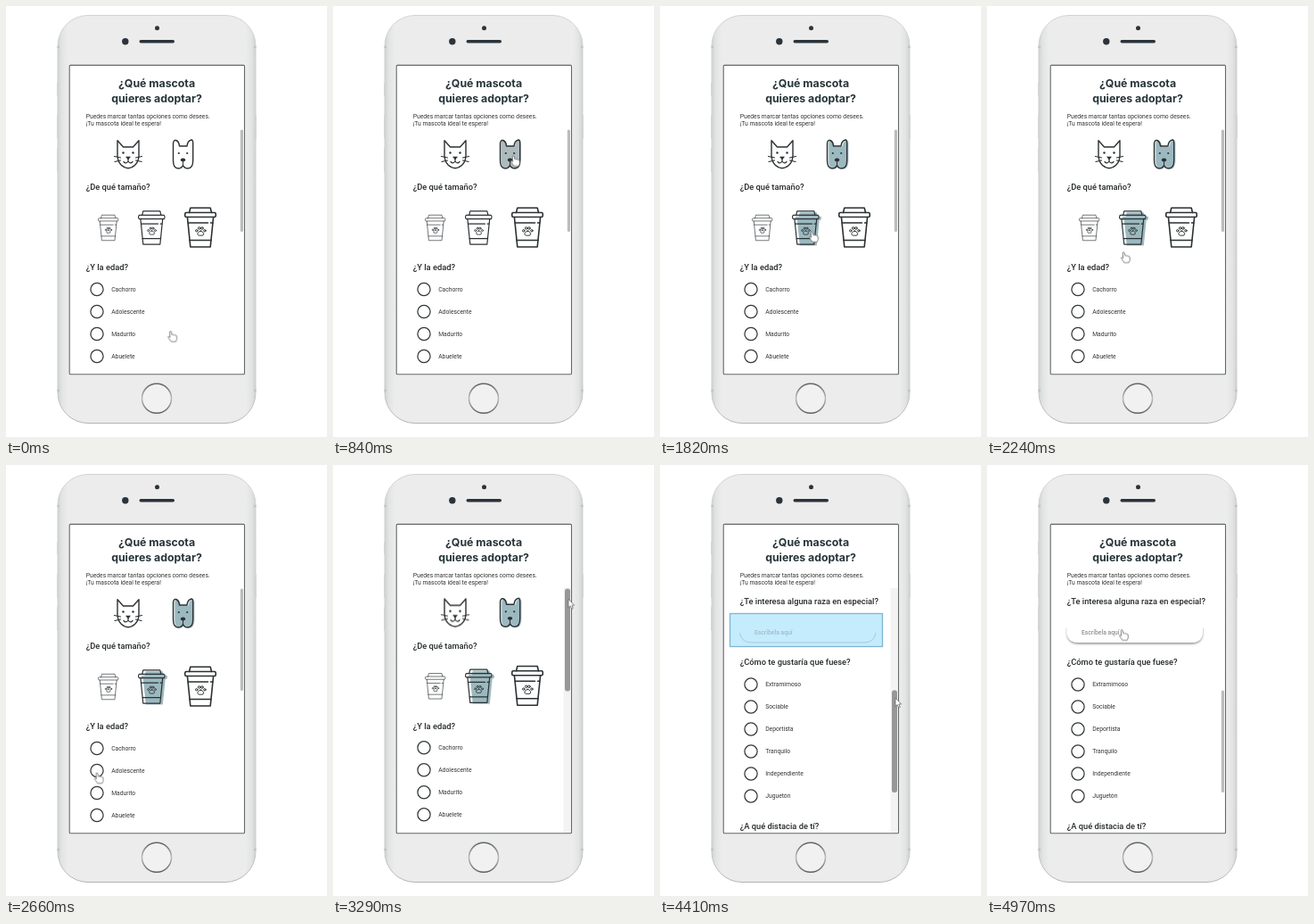
An HTML page that plays this animation: 360x483 px, repeating every 5040 ms.

```html
<!DOCTYPE html>
<html lang="es">
<head>
<meta charset="utf-8">
<title>Adopta una mascota</title>
<style>
  html, body { margin: 0; width: 100%; height: 100%; overflow: hidden; background: #fff; }
  svg { display: block; width: 100vw; height: 100vh; }
  text { font: 6.75px Roboto, sans-serif; fill: #333; }
  .title { font: 700 12.3px Inter, sans-serif; fill: #263439; text-anchor: middle; }
  .head { font-size: 9.3px; font-weight: 500; fill: #262a2b; }
  .hint { font-weight: 500; fill: #909090; }
  .line { fill: none; stroke: #2b3032; stroke-width: 1.4; stroke-linecap: round; stroke-linejoin: round; }
  .line * { vector-effect: non-scaling-stroke; }
  .thin { stroke-width: 1; }
  .ink { fill: #2b3032; stroke: none; }
  .ring { fill: none; stroke: #333738; stroke-width: 1.25; }
  .hover { fill: #aebbbe; stroke: none; }
  .picked { fill: #9cb9c0; stroke: none; }

  /* One 5040 ms clock drives everything */
  .cursor, .page, .thumb, .anim { animation: 5040ms infinite; }
  .cursor { animation-name: travel; animation-timing-function: ease-in-out; }
  .page { animation-name: scroll; animation-timing-function: ease-in-out; }
  .thumb { animation-name: slide; animation-timing-function: ease-in-out; }
  .anim { animation-timing-function: step-end; opacity: 0; }
  .dog-hover { animation-name: dogHover; }
  .dog-picked { animation-name: dogPicked; }
  .cup-hover { animation-name: cupHover; }
  .cup-picked { animation-name: cupPicked; }
  .hand { animation-name: hand; }
  .arrow { animation-name: arrow; }
  .bar-thin { animation-name: barThin; }
  .bar-wide { animation-name: barWide; }
  .bar-held { animation-name: barHeld; }
  .marked { animation-name: marked; }

  @keyframes travel {
    0%, 3% { transform: translate(184.3px, 364.2px); }
    15%, 24% { transform: translate(202px, 167.5px); }
    33%, 41% { transform: translate(170px, 252.5px); }
    51%, 56% { transform: translate(101.7px, 344.7px); }
    63%, 65% { transform: translate(264px, 150px); }
    73% { transform: translate(264px, 264px); }
    76%, 77% { transform: translate(267px, 220px); }
    84%, 89% { transform: translate(264px, 261px); }
    97%, 100% { transform: translate(151px, 184.5px); }
  }
  @keyframes scroll { 0%, 65% { transform: none; } 73%, 100% { transform: translateY(-270px); } }
  @keyframes slide { 0%, 65% { transform: none; } 73%, 100% { transform: translateY(114px); } }
  @keyframes dogHover { 0% { opacity: 0; } 14% { opacity: 1; } 20.8% { opacity: 0; } }
  @keyframes dogPicked { 0% { opacity: 0; } 20.8%, 100% { opacity: 1; } }
  @keyframes cupHover { 0% { opacity: 0; } 31.9% { opacity: 1; } 35.5% { opacity: 0; } }
  @keyframes cupPicked { 0% { opacity: 0; } 35.5%, 100% { opacity: 1; } }
  @keyframes hand { 0% { opacity: 1; } 61.1% { opacity: 0; } 91.7%, 100% { opacity: 1; } }
  @keyframes arrow { 0% { opacity: 0; } 61.1% { opacity: 1; } 91.7%, 100% { opacity: 0; } }
  @keyframes barThin { 0% { opacity: 1; } 62.5% { opacity: 0; } 93%, 100% { opacity: 1; } }
  @keyframes barWide { 0% { opacity: 0; } 62.5% { opacity: 1; } 93%, 100% { opacity: 0; } }
  @keyframes barHeld { 0% { opacity: 0; } 65% { opacity: 1; } 73.6% { opacity: 0; } 81.9% { opacity: 1; } 90.3%, 100% { opacity: 0; } }
  @keyframes marked { 0% { opacity: 0; } 81.9% { opacity: 1; } 90.3%, 100% { opacity: 0; } }
</style>
</head>
<body>
<svg viewBox="0 0 360 483">
  <defs>
    <linearGradient id="body">
      <stop offset="0" stop-color="#cfd2d0"/>
      <stop offset=".02" stop-color="#e2e4e3"/>
      <stop offset=".05" stop-color="#ebeceb"/>
      <stop offset=".95" stop-color="#ebeceb"/>
      <stop offset=".98" stop-color="#e2e4e3"/>
      <stop offset="1" stop-color="#cfd2d0"/>
    </linearGradient>
    <linearGradient id="edge" x2="0" y2="1">
      <stop offset="0" stop-color="#d0d3d1"/>
      <stop offset=".9" stop-color="#cccfcd"/>
      <stop offset="1" stop-color="#b2b5b3"/>
    </linearGradient>
    <linearGradient id="metal" x2="0" y2="1">
      <stop offset="0" stop-color="#626566"/>
      <stop offset=".5" stop-color="#b9bbbb"/>
      <stop offset="1" stop-color="#5c5f60"/>
    </linearGradient>
    <filter id="drop" x="-10%" y="-30%" width="120%" height="180%">
      <feDropShadow dx="0" dy="1.6" stdDeviation="1" flood-opacity=".42"/>
    </filter>
    <clipPath id="view"><rect x="72" y="137" width="195" height="275"/></clipPath>

    <path id="dog" d="M187.500 154Q188 150 190.500 150.500 194 151.500 194.500 157H203Q203.500 151 208 150 209.700 150 209.700 154V173Q209.700 182 204 182 200 182 198.500 178.500 197 182 193 182 187.500 182 187.500 173Z"/>
    <path id="cup" d="M5.500 6.500 6.800 1.200H29.200L30.500 6.500H34Q35.300 6.500 35.300 9T34 11.500H32.600L29.200 45H6.800L3.400 11.500H2Q.7 11.500 .7 9T2 6.500Z"/>
    <g id="cup-lines">
      <use href="#cup"/>
      <path d="M5.500 6.500H30.500M3.400 11.500H32.600M4.200 18H26.500M29.500 18H31.800M6 37.500H30"/>
      <g class="thin">
        <path d="M18.300 27Q20 27 21.500 29.500 22.500 32.500 18.300 32.200 14.100 32.500 15.100 29.500 16.600 27 18.300 27Z"/>
        <circle cx="13.700" cy="26.800" r="1.200"/>
        <circle cx="16.700" cy="24" r="1.300"/>
        <circle cx="19.900" cy="24" r="1.300"/>
        <circle cx="22.900" cy="26.800" r="1.200"/>
      </g>
    </g>
    <circle id="ring" cx="102" r="7.100" class="ring"/>
  </defs>

  <!-- Phone -->
  <g fill="#dadcdb">
    <rect x="57" y="86" width="2" height="15" rx="1"/>
    <rect x="57" y="122" width="2" height="27" rx="1"/>
    <rect x="57" y="159" width="2" height="27" rx="1"/>
    <rect x="279" y="122" width="2" height="27" rx="1"/>
  </g>
  <rect x="58" y="10.500" width="222" height="457" rx="34" fill="url(#body)" stroke="url(#edge)"/>
  <path d="M57.500 46H60M278 46H280.500M57.500 431H60M278 431H280.500" stroke="#c0c3c2" stroke-width="2.500"/>
  <g fill="#2b333b">
    <circle cx="169.500" cy="24.800" r="2.500"/>
    <circle cx="133.800" cy="39.700" r="3.700"/>
    <rect x="149.500" y="37.900" width="39.500" height="3.500" rx="1.750"/>
  </g>
  <circle cx="169" cy="439.800" r="16.500" fill="#f0f1f0" stroke="url(#metal)" stroke-width="1.500"/>
  <rect x="71.200" y="66.400" width="196.300" height="346.400" rx="1" fill="#fff" stroke="#646869" stroke-width="1.100"/>

  <text class="title" x="169" y="90.500">¿Qué mascota</text>
  <text class="title" x="169" y="107.500">quieres adoptar?</text>
  <text x="89.700" y="126.300">Puedes marcar tantas opciones como desees.</text>
  <text x="89.700" y="133.500">¡Tu mascota ideal te espera!</text>

  <g clip-path="url(#view)">
    <g class="page">
      <!-- Cat and dog -->
      <g class="line">
        <path d="M125 168V150.800L131.500 158H142.500L149 150.800V168Q148.500 177 141.500 180.500 137 183 132.500 180.500 125.500 177 125 168Z"/>
        <path d="M121.500 168.500 128.500 170M122 174.500 128.500 173M152.500 168.500 145.500 170M152 174.500 145.500 173M137 171.500V174Q134.500 177.500 132 174.500M137 174Q139.500 177.500 142 174.500" stroke-width="1.200"/>
        <path class="ink" d="M134 168.800H140L137 172.500Z"/>
        <circle class="ink" cx="131.500" cy="164.500" r="1.200"/>
        <circle class="ink" cx="142.500" cy="164.500" r="1.200"/>
      </g>
      <use href="#dog" class="anim dog-hover hover" x="1"/>
      <use href="#dog" class="anim dog-picked picked" x="1.500" y=".5"/>
      <g class="line">
        <use href="#dog"/>
        <path class="thin" d="M198.500 174V178.500"/>
        <ellipse class="ink" cx="198.500" cy="172.500" rx="2.700" ry="1.900"/>
        <circle class="ink" cx="193.800" cy="165" r="1.100"/>
        <circle class="ink" cx="203.200" cy="165" r="1.100"/>
      </g>

      <text class="head" x="89.700" y="206.300">¿De qué tamaño?</text>
      <g class="line">
        <use href="#cup-lines" class="thin" transform="translate(103 233.500) scale(.65)"/>
        <g transform="translate(148 228.800) scale(.85)">
          <use href="#cup" class="anim cup-hover hover" x="3" y="1.500"/>
          <use href="#cup" class="anim cup-picked picked" x="3.500" y="1.500"/>
          <use href="#cup-lines"/>
        </g>
        <use href="#cup-lines" transform="translate(200 225)" stroke-width="1.600"/>
      </g>

      <text class="head" x="89.700" y="296.300">¿Y la edad?</text>
      <use href="#ring" y="317.500"/><text x="118.200" y="319.800">Cachorro</text>
      <use href="#ring" y="342.500"/><text x="118.200" y="344.800">Adolescente</text>
      <use href="#ring" y="367.500"/><text x="118.200" y="369.800">Madurito</text>
      <use href="#ring" y="392.500"/><text x="118.200" y="394.800">Abuelete</text>

      <!-- Second part of the form -->
      <g transform="translate(0 270)">
        <text class="head" x="89.700" y="156.300">¿Te interesa alguna raza en especial?</text>
        <path d="M89.500 178V187Q90 199 103 199H229Q241.500 199 242 187V178Z" fill="#fff" filter="url(#drop)"/>
        <rect x="87" y="173" width="158" height="10" fill="#fff"/>
        <text class="hint" x="106" y="189.500">Escríbela aquí</text>
        <g class="anim marked">
          <rect x="78.500" y="166.500" width="171" height="37" fill="#c5ecfc" stroke="#7fb6cf" stroke-width="1.300"/>
          <path d="M89.500 188Q91 199 103 199H229Q240.500 199 242 188" fill="none" stroke="#a3cbdc"/>
          <text class="hint" x="106" y="189.500" style="fill:#9fbdca">Escríbela aquí</text>
        </g>
        <text class="head" x="89.700" y="224.300">¿Cómo te gustaría que fuese?</text>
        <use href="#ring" y="246"/><text x="118.200" y="248.300">Extramimoso</text>
        <use href="#ring" y="271"/><text x="118.200" y="273.300">Sociable</text>
        <use href="#ring" y="296"/><text x="118.200" y="298.300">Deportista</text>
        <use href="#ring" y="321"/><text x="118.200" y="323.300">Tranquilo</text>
        <use href="#ring" y="346"/><text x="118.200" y="348.300">Independiente</text>
        <use href="#ring" y="371"/><text x="118.200" y="373.300">Juguetón</text>
        <text class="head" x="89.700" y="408.300">¿A qué distacia de tí?</text>
      </g>
    </g>

    <rect class="anim bar-wide" x="258.500" y="138" width="8.500" height="274" fill="#f3f3f3"/>
    <g class="thumb">
      <rect class="anim bar-thin" x="262.800" y="138.500" width="3.200" height="114.500" rx="1.600" fill="#bcbcbc"/>
      <rect class="anim bar-wide" x="260" y="138.500" width="6" height="114.500" rx="3" fill="#b3b3b3"/>
      <rect class="anim bar-held" x="260" y="138.500" width="6" height="114.500" rx="3" fill="#979797"/>
    </g>
  </g>

  <g class="cursor" fill="#fff" stroke="#666" stroke-width=".8" stroke-linejoin="round">
    <path class="anim hand" d="M-.8 1Q0-.7 1.100 .7L1.800 4.200Q3 3.300 3.800 4.500Q5 3.700 5.700 4.900Q7 4.500 7.200 6L7.300 9.500 6 12H1L-1.500 8.500-2.600 6.600Q-2 5.400-.3 7Z"/>
    <path class="anim arrow" d="M0 0V9.500L2.200 7.600 3.700 11 5.300 10.300 3.800 7H6.700Z"/>
  </g>
</svg>
</body>
</html>
```
